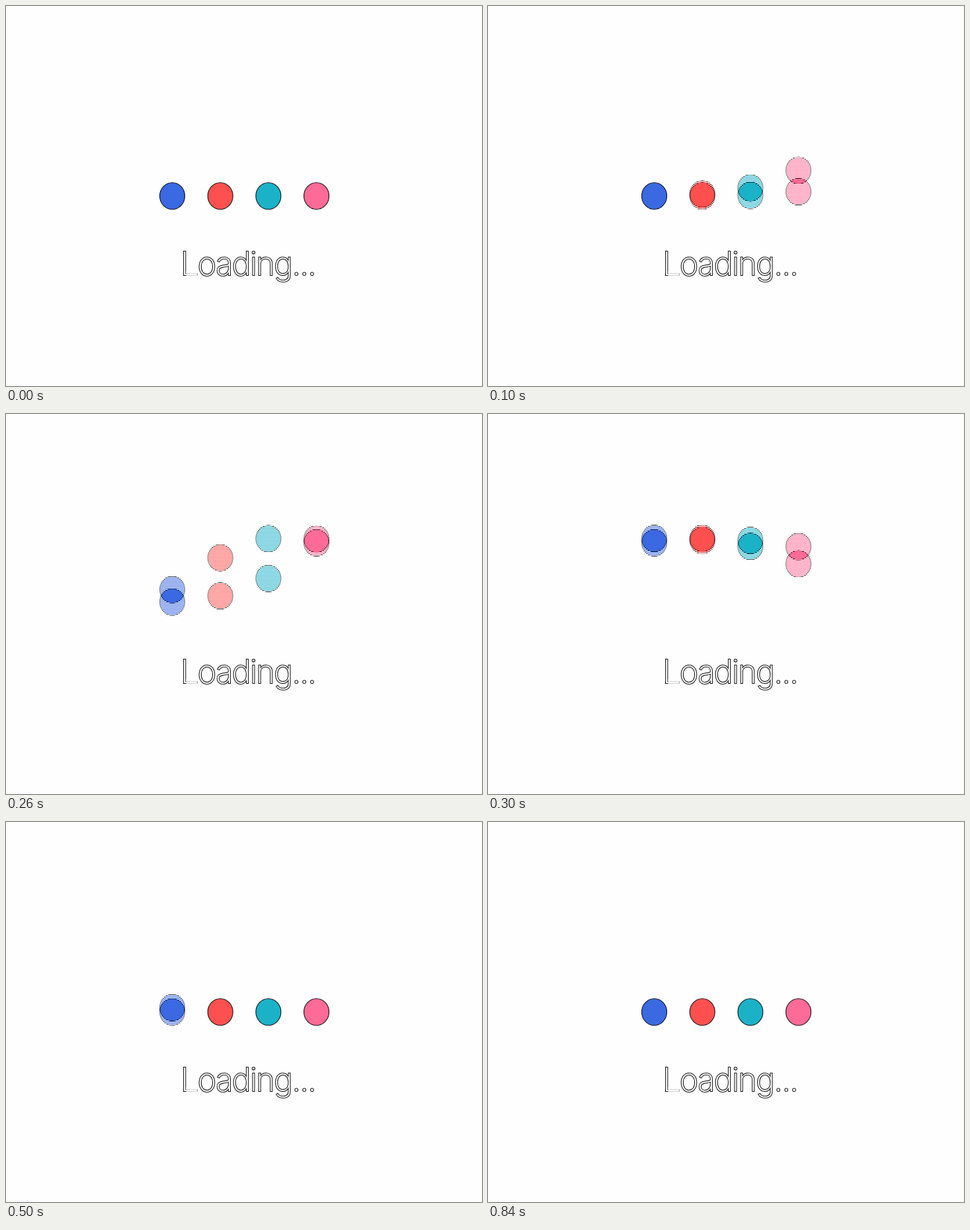
Animation, 720 px wide and 576 px high, one loop 1 s. Source, as an HTML page with a canvas:

```html
<!DOCTYPE html>
<html lang="en">
<head>
<meta charset="utf-8">
<title>Loading</title>
<style>
  html, body { margin: 0; height: 100%; overflow: hidden; background: #fefefe; }
  canvas, svg { position: absolute; left: 0; top: 0; }
  text {
    font: 200 48.5px Inter, "Liberation Sans", sans-serif;
    font-variation-settings: "opsz" 14;
    letter-spacing: -1.5px;
    fill: #fefefe;
    stroke: #111;
    stroke-width: 2px;
    paint-order: stroke;
  }
</style>
</head>
<body>
<canvas id="stage" width="720" height="576"></canvas>
<svg width="720" height="576">
  <text x="264" y="407.5">Loading...</text>
  <!-- The foot of the capital is much fainter than its stem. -->
  <rect x="272.5" y="402" width="17" height="8" fill="#fefefe" opacity="0.8"/>
</svg>
<script>
const ctx = document.getElementById('stage').getContext('2d');
const WIDTH = 720, HEIGHT = 576, LOOP = 1000, FRAME = 100;
const REST = 288, JUMP = 99.5;
const COLORS = ['#3a69e2', '#ff5050', '#1bb2c8', '#ff6b98'];

// Time is counted in small ticks; a rise and a fall each last MOVE ticks.
const MOVE = 10, TICKS_PER_FRAME = 5.25, FIELD_LAG = 2.6, BALL_LEAD = 2, FIRST_TICK = -7.7;

// Interlaced picture: odd rows show one moment, even rows a slightly later one.
const fields = [1, 0].map((firstRow, i) => {
  const rows = new Path2D();
  for (let y = firstRow; y < HEIGHT; y += 2) rows.rect(0, y, WIDTH, 1);
  return { rows, lag: i * FIELD_LAG };
});

const bezier = (a, b, s) => 3 * a * s * (1 - s) ** 2 + 3 * b * s * s * (1 - s) + s ** 3;

// cubic-bezier(0.93, 0, 0.58, 1), solved by bisection
function ease(x) {
  if (x <= 0) return 0;
  if (x >= 1) return 1;
  let low = 0, high = 1;
  for (let i = 0; i < 24; i++) {
    const mid = (low + high) / 2;
    if (bezier(0.93, 0.58, mid) < x) low = mid; else high = mid;
  }
  return bezier(0, 1, low);
}

const height = tick => JUMP * (ease(tick / MOVE) - ease(tick / MOVE - 1));

function drawBall(x, y, color) {
  ctx.beginPath();
  ctx.ellipse(x, y, 19, 20.2, 0, 0, 2 * Math.PI);
  ctx.fillStyle = color;
  ctx.fill();
  ctx.lineWidth = 1.1;
  ctx.strokeStyle = '#111';
  ctx.stroke();
}

function draw(time) {
  const frame = Math.floor(time % LOOP / FRAME);
  ctx.clearRect(0, 0, WIDTH, HEIGHT);
  for (const { rows, lag } of fields) {
    const tick = Math.round(frame * TICKS_PER_FRAME + FIRST_TICK - 2.5 + lag) + 2.5;
    ctx.save();
    ctx.clip(rows);
    COLORS.forEach((color, i) => {
      drawBall(251.5 + i * 72.7, REST - height(tick + i * BALL_LEAD), color);
    });
    ctx.restore();
  }
}

const start = performance.now();
function play() {
  draw(performance.now() - start);
  requestAnimationFrame(play);
}
play();
</script>
</body>
</html>
```
